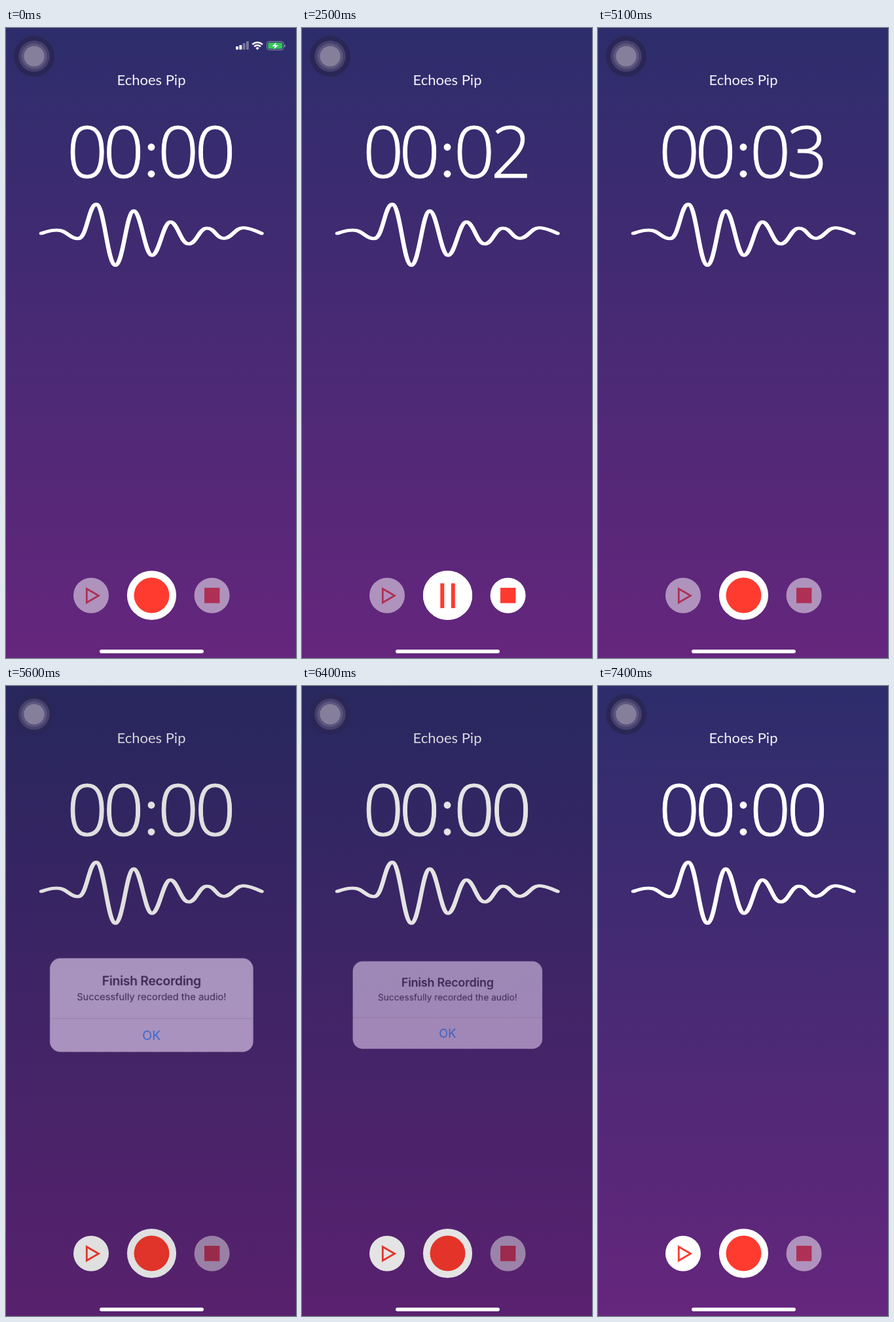
Animation, 443 px wide and 960 px high, one loop 8 s. Source, as an HTML page:

```html
<!DOCTYPE html>
<html lang="en">
<head>
<meta charset="utf-8">
<title>Voice recorder</title>
<style>
  html, body { margin: 0; width: 100%; height: 100%; overflow: hidden; background: #2d2d6b; }
  svg { display: block; width: 100%; height: 100%; }

  text { text-anchor: middle; }
  .title { font: 400 22px Lato, "Open Sans", sans-serif; fill: #f4f2f8; }
  .time text { font: 300 109px "Open Sans", Lato, sans-serif; stroke: #fff; stroke-width: 1; }
  .alert text { font: 400 13.7px Inter, Roboto, sans-serif; fill: #352a3a; }
  .alert .head { font-size: 18px; font-weight: 600; letter-spacing: -.25px; }
  .alert .ok { font-size: 18.2px; fill: #2f92ff; }

  .status, .pause, .stop, .play, .digit, .modal, .alert {
    animation: 8s linear infinite both;
  }
  .stop, .play, .digit { animation-timing-function: step-end; }

  .status { animation-name: status; }
  .pause { animation-name: pause; }
  .stop { animation-name: stop; }
  .play { animation-name: play; }
  .d0 { animation-name: zero; }
  .d1 { animation-name: one; }
  .d2 { animation-name: two; }
  .d3 { animation-name: three; }
  .modal { animation-name: modal; }
  .alert { animation-name: settle; transform-origin: 222.3px 486px; }

  @keyframes status { 0%, 1.25% { opacity: 1 } 8.75%, 100% { opacity: 0 } }
  @keyframes pause {
    0%, 6.24% { opacity: 0 }
    6.25%, 48.1% { opacity: 1 }
    49.7%, 100% { opacity: 0 }
  }
  @keyframes stop { 0% { opacity: .5 } 6.25% { opacity: 1 } 63.75%, 100% { opacity: .5 } }
  @keyframes play { 0% { opacity: .5 } 68.75%, 100% { opacity: 1 } }

  @keyframes zero { 0% { opacity: 1 } 18.75% { opacity: 0 } 68.75%, 100% { opacity: 1 } }
  @keyframes one { 0% { opacity: 0 } 18.75% { opacity: 1 } 31.25%, 100% { opacity: 0 } }
  @keyframes two { 0% { opacity: 0 } 31.25% { opacity: 1 } 43.75%, 100% { opacity: 0 } }
  @keyframes three { 0% { opacity: 0 } 43.75% { opacity: 1 } 68.75%, 100% { opacity: 0 } }

  /* Critically damped springs, in and out */
  @keyframes modal {
    0%, 68.75% { opacity: 0 }
    69.375% { opacity: .273 }
    70% { opacity: .607 }
    71.25% { opacity: .915 }
    72.5% { opacity: .985 }
    75%, 79.075% { opacity: 1 }
    79.375% { opacity: .913 }
    80% { opacity: .552 }
    80.625% { opacity: .279 }
    81.25% { opacity: .129 }
    82.5% { opacity: .024 }
    85%, 100% { opacity: 0 }
  }
  @keyframes settle {
    0%, 68.75% { transform: scale(1.185) }
    69.375% { transform: scale(1.134) }
    70% { transform: scale(1.073) }
    71.25% { transform: scale(1.016) }
    72.5% { transform: scale(1.003) }
    75%, 100% { transform: scale(1) }
  }
</style>
</head>
<body>
<svg viewBox="0 0 443 960" preserveAspectRatio="none">
  <defs>
    <linearGradient id="sky" x2="0" y2="1">
      <stop stop-color="#2d2d6b"/>
      <stop offset="1" stop-color="#65267d"/>
    </linearGradient>
    <path id="wave" d="M54 313C62 310 69 308 78 308C93 308 97 321 110 321C124 321 126 268.5 138 268.5
      S155 361.5 167 361.5S184 278.5 195 278.5S212 346.5 223 346.5S240 295.5 251 295.5
      S267 329 279 329S295 305 307 305S321 320.5 333 320.5S350 304.5 362 304.5C372 304.5 382 309 390.5 313"/>
  </defs>

  <rect width="443" height="960" fill="url(#sky)"/>

  <g class="status" fill="#fff">
    <rect x="351" y="28" width="4" height="5" rx="1"/>
    <rect x="356.3" y="26" width="4" height="7" rx="1"/>
    <g opacity=".35">
      <rect x="361.6" y="23" width="4" height="10" rx="1"/>
      <rect x="366.9" y="20" width="4" height="13" rx="1"/>
    </g>
    <g fill="none" stroke="#fff" stroke-width="2.5">
      <path d="M376.3 25.2a11 11 0 0 1 15.6 0"/>
      <path d="M379.2 28.3a7 7 0 0 1 9.8 0"/>
    </g>
    <path d="M381.4 30.6a4 4 0 0 1 5.4 0L384.1 33.4Z"/>
    <rect x="398.5" y="20.5" width="25.5" height="13" rx="3.8" fill="none" stroke="#fff" stroke-opacity=".45"/>
    <rect x="400.3" y="22.3" width="21.9" height="9.4" rx="2.3" fill="#34c759"/>
    <path d="M425.2 25a2.3 2.3 0 0 1 0 4.4Z" opacity=".5"/>
    <path d="M412.8 21.8L406.5 27.8H410.6L409.3 32.4L415.8 26.2H411.6Z"/>
  </g>

  <text class="title" x="222" y="87">Echoes Pip</text>

  <g class="time" fill="#fff">
    <text x="124 179.7 263.2" y="227.5">000</text>
    <circle cx="222" cy="181.5" r="5.4"/>
    <circle cx="222" cy="222.3" r="5.4"/>
    <text class="digit d0" x="319.7" y="227.5">0</text>
    <text class="digit d1" x="319.7" y="227.5">1</text>
    <text class="digit d2" x="319.7" y="227.5">2</text>
    <text class="digit d3" x="319.7" y="227.5">3</text>
  </g>

  <g fill="none" stroke="#fff" stroke-width="4.6" stroke-linecap="round">
    <use href="#wave" x="-1"/>
    <use href="#wave" x="1"/>
  </g>

  <g class="play">
    <circle cx="130" cy="864.7" r="27" fill="#fff"/>
    <path d="M123.3 854.5L141.5 865L123.3 875.5Z" fill="none" stroke="#ff3b30" stroke-width="2.8"/>
  </g>

  <circle cx="222.5" cy="864.5" r="37.6" fill="#fff"/>
  <circle cx="222.5" cy="864.5" r="27" fill="#ff3b30"/>
  <g class="pause">
    <circle cx="222.5" cy="864.5" r="37.6" fill="#fff"/>
    <path d="M211.3 846.3h6v37.6h-6zM227.8 846.3h6v37.6h-6z" fill="#ff3b30"/>
  </g>

  <g class="stop">
    <circle cx="314.6" cy="864.7" r="27" fill="#fff"/>
    <rect x="303" y="853" width="23.4" height="23.4" fill="#ff3b30"/>
  </g>

  <g class="modal">
    <rect width="443" height="960" opacity=".2"/>
    <g class="alert">
      <rect x="77.5" y="419.5" width="289.6" height="133.3" rx="15" fill="#e7d6ee"/>
      <path d="M77.5 505.3H367.1" stroke="#000" stroke-opacity=".13"/>
      <text class="head" x="222.3" y="458">Finish Recording</text>
      <text x="222.3" y="479.5">Successfully recorded the audio!</text>
      <text class="ok" x="222.3" y="535.8">OK</text>
    </g>
  </g>

  <circle cx="43" cy="43" r="31" fill="#2a2757"/>
  <circle cx="43" cy="43" r="23.7" fill="#46406d"/>
  <circle cx="43" cy="43" r="19.6" fill="#5c567e"/>
  <circle cx="43" cy="43" r="15.6" fill="#857f9b"/>
  <rect x="143" y="947.3" width="159" height="5.4" rx="2.7" fill="#fff"/>
</svg>
</body>
</html>
```
